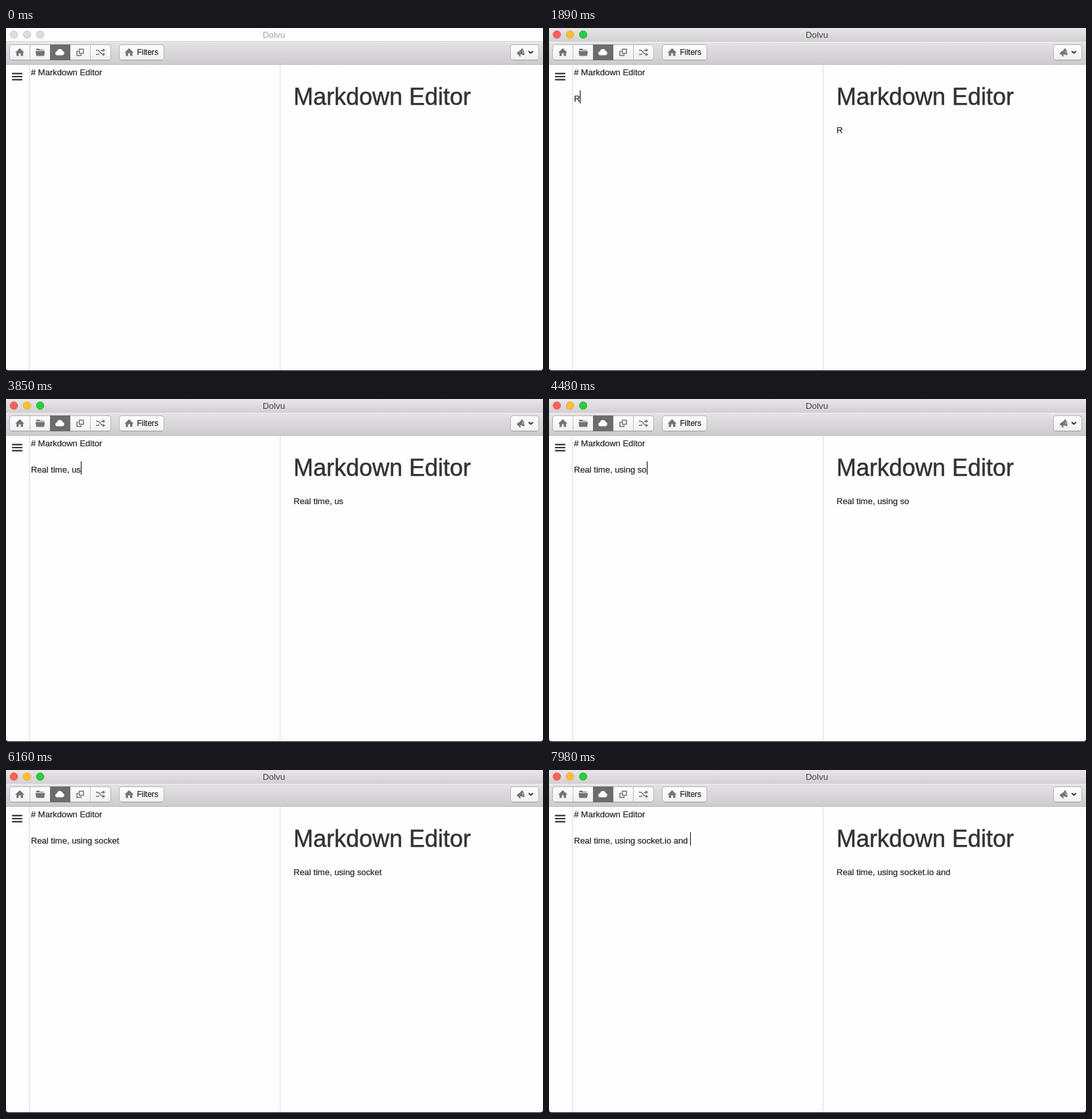
These frames come from a looping animation (818 by 522 pixels, 8 s). An HTML page:

```html
<!DOCTYPE html>
<html lang="en">
<head>
<meta charset="utf-8">
<title>Markdown Editor</title>
<style>
  html, body { margin: 0; width: 100%; height: 100%; overflow: hidden; background: #fff; }
  svg { display: block; }
  text { font: 13px "Liberation Sans", Arial, sans-serif; fill: #222; stroke: #222; stroke-width: .2; white-space: pre; }
  .heading { font-size: 36px; fill: #333; stroke: #333; stroke-width: .5; }
  .label { font-size: 12px; }
  .title { font-size: 13.4px; text-anchor: middle; fill: #444; stroke: none; }
  .button { fill: url(#buttonFill); stroke: #b5b3b5; }
  .icon { fill: #737475; }
  .line { fill: none; stroke: #737475; stroke-width: 1.5; }
  .lights circle { stroke-width: .8; }
  .inactive .title { fill: #a4a4a4; }
  .inactive .titlebar { fill: #fdfdfd; }
  .inactive .lights circle { fill: #dcdcdc; stroke: #c9c9c9; }
</style>
</head>
<body>
<svg id="window" class="inactive" width="818" height="522" viewBox="0 0 818 522">
  <defs>
    <linearGradient id="titleFill" x2="0" y2="1">
      <stop stop-color="#e8e6e8"/><stop offset="1" stop-color="#d3d1d3"/>
    </linearGradient>
    <linearGradient id="toolFill" x2="0" y2="1">
      <stop stop-color="#e4e2e4"/><stop offset="1" stop-color="#cdcbcd"/>
    </linearGradient>
    <linearGradient id="buttonFill" x2="0" y2="1">
      <stop stop-color="#fdfdfd"/><stop offset="1" stop-color="#f1f1f1"/>
    </linearGradient>
    <path id="home" d="M0-6.2 7 .5H5V5.5H1.5V1.5H-1.5V5.5H-5V.5H-7Z"/>
  </defs>

  <rect y="500" width="818" height="22" fill="#111"/>
  <rect y="-9" width="818" height="530" rx="4" fill="#fefefe"/>
  <rect class="titlebar" width="818" height="20" fill="url(#titleFill)"/>
  <rect y="20" width="818" height="1" fill="#cfcdcf"/>
  <rect y="21" width="818" height="1" fill="#f3f2f3"/>
  <rect y="22" width="818" height="33" fill="url(#toolFill)"/>
  <rect y="55" width="818" height="1" fill="#bcbabc"/>
  <g class="lights">
    <circle cx="12" cy="10" r="5.8" fill="#fc605b" stroke="#e2504b"/>
    <circle cx="32" cy="10" r="5.8" fill="#fdbe35" stroke="#e0a42c"/>
    <circle cx="52" cy="10" r="5.8" fill="#2aca41" stroke="#22b036"/>
  </g>
  <text class="title" x="408" y="15">Dolvu</text>

  <path d="M8 49H157M175 49H238M771 49H809" stroke="#a5a3a5"/>
  <rect class="button" x="5.5" y="25.5" width="154" height="23" rx="3.5"/>
  <rect class="button" x="172.5" y="25.5" width="68" height="23" rx="3.5"/>
  <rect class="button" x="768.5" y="25.5" width="43" height="23" rx="3.5"/>
  <path d="M36.5 26V48M128.5 26V48" stroke="#c2c0c2"/>
  <rect x="67" y="25" width="31" height="24" fill="#6d6c6d"/>

  <use href="#home" class="icon" x="21" y="37"/>
  <path class="icon" d="M46 34V32.5Q46 31.5 47 31.5H50.5L52 33H57Q58 33 58 34ZM45 35H59.2L58.3 41.5Q58.2 42.5 57.2 42.5H47Q46 42.5 45.9 41.5Z"/>
  <path fill="#fff" d="M77.5 41.5A3 3 0 0 1 77.6 35.6 4.6 4.6 0 0 1 86.4 35.1 3.3 3.3 0 0 1 86.3 41.5Z"/>
  <path class="line" d="M111.7 32.3H118V38.6H111.7ZM110.5 35.5H108V41.7H114.3V39.8"/>
  <path class="line" d="M137 33.7H139.5C143 33.7 144 40.3 148 40.3M137 40.3H139.5Q141 40.3 142 39M144.5 35Q146 33.7 148 33.7"/>
  <path class="icon" d="M147.5 31 151.3 33.7 147.5 36.4ZM147.5 37.6 151.3 40.3 147.5 43Z"/>
  <use href="#home" class="icon" x="187.5" y="37"/>
  <text class="label" x="199.4" y="41">Filters</text>
  <path class="icon" d="M778.2 37.8 780 36.2Q784 34.5 785.4 31.2L786.6 31Q789.8 35 789.8 40.8L788.8 41.6Q786 39.8 782.8 40L784.4 42.6 782.6 43.4 780.4 40.4 778.8 40Z"/>
  <path d="M786.4 33.8Q788.2 36.4 788.4 39.2L786.8 37.6Z" fill="#e8e8e8"/>
  <path d="M796.2 35.2 799.5 38.2 802.8 35.2" fill="none" stroke="#333" stroke-width="1.9"/>

  <path d="M35.5 56V521M417.5 56V521" stroke="#dcdcdc"/>
  <path d="M10 69.3H24M10 74H24M10 78.7H24" stroke="#333" stroke-width="2.2" stroke-linecap="round"/>
  <text x="38" y="72"># Markdown Editor</text>
  <text class="heading" x="438" y="117.3">Markdown Editor</text>
  <text id="editor" x="38" y="112"></text>
  <text id="preview" x="438" y="160"></text>
  <rect id="caret" width="1" height="20"/>
</svg>
<script>
  const DURATION = 8000, CLICK = 910, FOCUS = 980, NEW_LINE = 1610, BLINK = 560;

  // Each burst is typed at an even pace, first key at start and last key at end.
  const BURSTS = [
    { keys: "Real ti", start: 1890, end: 2520 },
    { keys: "me", start: 2730, end: 2870 },
    { keys: ", using sock", start: 3520, end: 4690 },
    { keys: "et", start: 5530, end: 5600 },
    { keys: ".\b", start: 6230, end: 6300 },
    { keys: ".io", start: 6650, end: 7210 },
    { keys: " and ", start: 7490, end: 7980 }
  ];

  const [appWindow, editor, preview, caret] =
    ["window", "editor", "preview", "caret"].map(id => document.getElementById(id));
  const pen = document.createElement("canvas").getContext("2d");
  pen.font = '13px "Liberation Sans", Arial, sans-serif';

  const press = (text, key) => key === "\b" ? text.slice(0, -1) : text + key;

  function stateAt(time) {
    let text = "", lastKey = time < NEW_LINE ? CLICK : NEW_LINE;
    for (const { keys, start, end } of BURSTS) {
      if (time < start) break;
      const pace = (end - start) / (keys.length - 1);
      const count = Math.min(keys.length, Math.floor((time - start) / pace) + 1);
      text = [...keys.slice(0, count)].reduce(press, text);
      lastKey = start + (count - 1) * pace;
    }
    return { text, lastKey };
  }

  function render(time) {
    const { text, lastKey } = stateAt(time);
    const focused = time >= FOCUS;
    const lit = Math.floor((time - lastKey) / BLINK) % 2 === 0;
    appWindow.classList.toggle("inactive", !focused);
    editor.textContent = preview.textContent = text;
    caret.setAttribute("x", Math.round(38 + pen.measureText(text).width));
    caret.setAttribute("y", time < NEW_LINE ? 75 : 95);
    caret.setAttribute("visibility", focused && lit ? "visible" : "hidden");
  }

  const began = performance.now();
  function tick() {
    render((performance.now() - began) % DURATION);
    requestAnimationFrame(tick);
  }
  tick();
</script>
</body>
</html>
```
